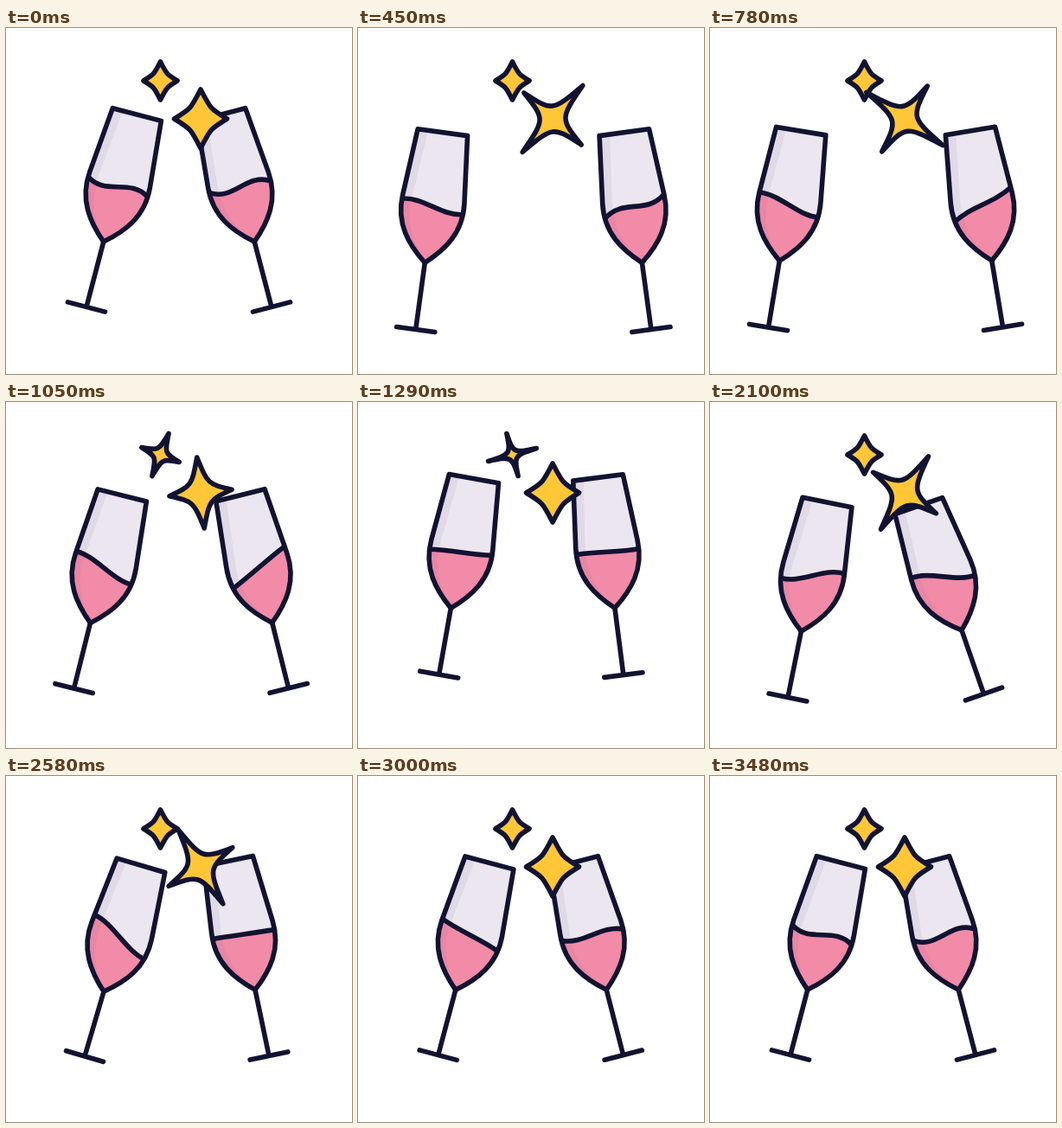
Recreate the animation shown at these times as an HTML page with a canvas. Size 400 by 400 pixels, loop 5.66 s.

```html
<!DOCTYPE html>
<html lang="en">
<head>
<meta charset="utf-8">
<title>Cheers</title>
<style>
  html, body { margin: 0; width: 100%; height: 100%; overflow: hidden; background: #fff; }
  canvas { display: block; width: 100vmin; height: 100vmin; }
</style>
</head>
<body>
<canvas id="stage"></canvas>
<script>
const SIZE = 400, LOOP = 5660, STEP = 30, END = 3480;
const INK = '#121331', GLASS = '#ebe6ef', GLASS_SHADE = '#e0d9e6';
const WINE = '#f28ba8', WINE_SHADE = '#e687a5', GOLD = '#ffc738';

const canvas = document.getElementById('stage');
const ctx = canvas.getContext('2d');

// Rows: time, foot x, foot y, tilt in degrees
const leftPose = [
  [0, 93, 322.5, 14.7], [560, 63.8, 351.5, 7], [1140, 82.7, 326, 14.5],
  [1710, 125.3, 287.4, -11.3], [2100, 90, 341.5, 11.4], [2160, 87.5, 343, 12.5],
  [2280, 86.5, 337, 14], [2580, 91, 324, 16.4], [2900, 92.6, 322.7, 15], [3450, 93, 322.5, 14.7]
];
const rightPose = [
  [0, 307, 322.5, -14.7], [560, 342.5, 351.5, -7], [1140, 322, 326, -14.5],
  [1530, 285, 303, 7.2], [2100, 316.5, 337.5, -19.1], [2170, 317, 338, -19],
  [2280, 314, 335, -17], [2580, 304, 323.5, -11.8], [2900, 306.5, 322.7, -14.3], [3450, 307, 322.5, -14.7]
];
// Rows: time, slope of the surface, bend of the surface
const leftWave = [
  [0, 2.5, -14], [450, 4.5, 9.5], [1050, 11, 11], [1560, -19.3, -11],
  [2100, -9.5, -13], [2580, 16.7, 14], [3450, 2.5, -14]
];
const rightWave = [
  [0, 2.5, -14], [450, -9.5, 12], [1050, -17, -7], [1560, 23, 14],
  [2100, 10.3, 12], [2580, 2, 1], [3450, 2.5, -14]
];

const clamp = v => Math.min(1, Math.max(0, v));
const smooth = v => v * v * (3 - 2 * v);

// Slope at a key: flat at turning points, harmonic mean elsewhere
function slope(rows, i, c) {
  if (i === 0 || i === rows.length - 1) return 0;
  const rate = k => (rows[k + 1][c] - rows[k][c]) / (rows[k + 1][0] - rows[k][0]);
  const a = rate(i - 1), b = rate(i);
  return a * b > 0 ? 2 * a * b / (a + b) : 0;
}

function sample(rows, t) {
  let i = 0;
  while (i < rows.length - 2 && t >= rows[i + 1][0]) i++;
  const from = rows[i], to = rows[i + 1];
  const span = to[0] - from[0], u = clamp((t - from[0]) / span), s = smooth(u);
  return from.slice(1).map((v, k) => {
    const c = k + 1;
    return v * (1 - s) + to[c] * s
      + span * (slope(rows, i, c) * u * (1 - u) ** 2 - slope(rows, i + 1, c) * u * u * (1 - u));
  });
}

// Glass shapes: origin at the foot, y grows downwards
function bowlPath() {
  const p = new Path2D();
  p.moveTo(-29, -230);
  p.lineTo(-36, -152);
  p.bezierCurveTo(-39, -118, -21, -96, 0, -78);
  p.bezierCurveTo(21, -96, 39, -118, 36, -152);
  p.lineTo(29, -230);
  p.closePath();
  return p;
}

function shadePath() {
  const p = new Path2D();
  p.moveTo(-40, -230);
  p.lineTo(-17, -230);
  p.lineTo(-25, -152);
  p.bezierCurveTo(-28, -118, -14, -96, 0, -78);
  p.lineTo(-40, -78);
  p.closePath();
  return p;
}

const bowl = bowlPath(), shade = shadePath();
const stem = new Path2D('M0 -78V0M-22.3 0H22.3');

function drawGlass(pose, wave, t) {
  const [x, y, tilt] = sample(pose, t);
  const [e, q] = sample(wave, t);
  const surface = new Path2D();
  surface.moveTo(-36, -143.5 - e);
  surface.bezierCurveTo(-12, -143.5 - q, 12, -143.5 + q, 36, -143.5 + e);
  const wine = new Path2D(surface);
  wine.lineTo(44, -70);
  wine.lineTo(-44, -70);
  wine.closePath();

  ctx.save();
  ctx.translate(x, y);
  ctx.rotate(tilt * Math.PI / 180);
  ctx.stroke(stem);
  ctx.save();
  ctx.clip(bowl);
  fill(bowl, GLASS);
  fill(shade, GLASS_SHADE);
  ctx.save();
  ctx.clip(wine);
  fill(bowl, WINE);
  fill(shade, WINE_SHADE);
  ctx.restore();
  ctx.stroke(surface);
  ctx.restore();
  ctx.stroke(bowl);
  ctx.restore();
}

function fill(path, color) {
  ctx.fillStyle = color;
  ctx.fill(path);
}

// A spin is half a turn; the points stretch and the waist narrows midway
function drawStar(star, t) {
  const start = star.spins.filter(s => s <= t).pop();
  const u = start === undefined ? 0 : clamp((t - start) / star.time);
  const m = Math.sin(Math.PI * u);
  const [w, h, c] = star.size.map((v, i) => v + star.grow[i] * m);
  const p = new Path2D();
  p.moveTo(0, -h);
  p.bezierCurveTo(c, -c, c, -c, w, 0);
  p.bezierCurveTo(c, c, c, c, 0, h);
  p.bezierCurveTo(-c, c, -c, c, -w, 0);
  p.bezierCurveTo(-c, -c, -c, -c, 0, -h);
  p.closePath();
  ctx.save();
  ctx.translate(star.x, star.y);
  ctx.rotate(Math.PI * smooth(u));
  fill(p, GOLD);
  ctx.stroke(p);
  ctx.restore();
}

const bigStar = {
  x: 225, y: 105, size: [30.5, 34, 11.5], grow: [17, 21.5, -6.5], spins: [123, 1815], time: 1040
};
const smallStar = {
  x: 178.5, y: 61, size: [19.5, 22, 7.4], grow: [6, 7, -6], spins: [824], time: 1050
};

function draw(t) {
  const scale = canvas.width / SIZE;
  ctx.setTransform(scale, 0, 0, scale, 0, 0);
  ctx.fillStyle = '#fff';
  ctx.fillRect(0, 0, SIZE, SIZE);
  ctx.strokeStyle = INK;
  ctx.lineWidth = 5.6;
  ctx.lineCap = ctx.lineJoin = 'round';
  drawGlass(leftPose, leftWave, t);
  drawGlass(rightPose, rightWave, t);
  drawStar(smallStar, t);
  drawStar(bigStar, t);
}

function resize() {
  const side = Math.min(innerWidth, innerHeight) || SIZE;
  canvas.width = canvas.height = Math.round(side * (devicePixelRatio || 1));
}

const begin = performance.now();
function frame() {
  const t = (performance.now() - begin) % LOOP;
  draw(Math.min(END, Math.floor(t / STEP) * STEP));
  requestAnimationFrame(frame);
}

addEventListener('resize', resize);
resize();
frame();
</script>
</body>
</html>
```
